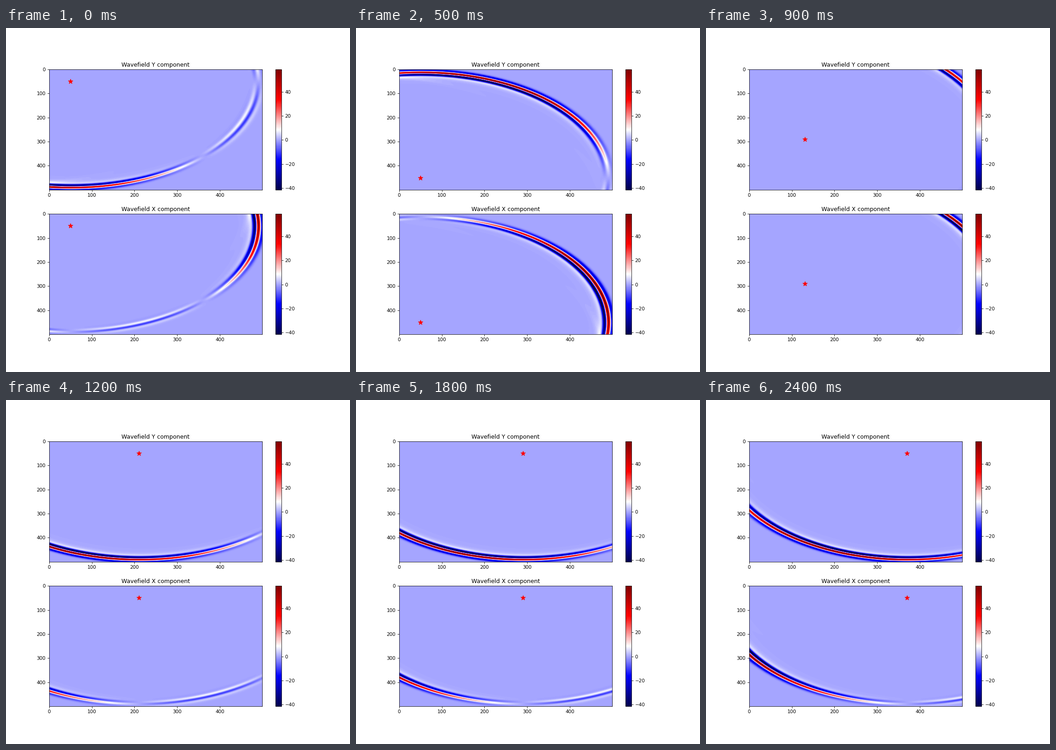
Recreate the animation shown at these times as a matplotlib script. Size 748 px wide and 748 px high, loop 2500 ms.

```python
import numpy as np
import matplotlib.pyplot as plt
from matplotlib.animation import FuncAnimation

N = 500             # grid points per side
RADIUS = 439        # distance travelled by the wavefront
WAVELENGTH = 25
PEAK = 53
SHIFT = 1           # the wave is centred one node past the marker
VMIN, VMAX = -41.3, 58.7
FRAMES = 25
DPI = 75

X, Y = np.meshgrid(np.arange(N, dtype=float), np.arange(N, dtype=float))


def make_pulse(n=8192, step=0.25):
    """Half-differentiated Ricker wavelet: shallow front, deep trailing lobe."""
    f = np.fft.rfftfreq(n, step)
    spectrum = f**2.5 * np.exp(-(f * WAVELENGTH)**2) * np.exp(0.25j * np.pi)
    pulse = np.fft.fftshift(np.fft.irfft(spectrum, n))
    lag = (np.arange(n) - pulse.argmax()) * step
    return lag, PEAK * pulse / pulse.max()


LAG, PULSE = make_pulse()


def ray(cx, cy):
    """Distance and P-wave polarisation for a diagonal force at (cx, cy)."""
    dx, dy = X - cx, Y - cy
    r = np.hypot(dx, dy) + 1e-9
    c, s = dx / r, dy / r
    return r, c * (c - s), s * (s - c)


def echo(cx, cy, depth):
    """Weak remainder of the wave sent back by an absorbing edge."""
    r, ux, uy = ray(cx, cy)
    amp = 4 * np.exp(-((r - RADIUS + 16) / 8)**2 - depth / 50)
    return amp * ux, amp * uy


def wavefield(sx, sy):
    r, ux, uy = ray(sx + SHIFT, sy + SHIFT)
    wave = np.interp(RADIUS - r, LAG, PULSE)
    fx, fy = wave * ux, wave * uy
    echoes = []
    if sx == 50:
        echoes.append(echo(-sx, sy, X))
    if sy == 50:
        echoes.append(echo(sx, -sy, Y))
    if sy == 450:
        echoes.append(echo(sx, 2 * N - sy, N - Y))
    for ex, ey in echoes:
        fx, fy = fx + ex, fy + ey
    return fx, fy


def source(i):
    col, row = divmod(i, 6)
    return 50 + 80 * col, 50 + 80 * row


fig, axes = plt.subplots(2, 1, figsize=(748 / DPI, 748 / DPI), dpi=DPI)
images, stars = [], []
for ax, name in zip(axes, "YX"):
    im = ax.imshow(np.zeros((N, N)), cmap="seismic", vmin=VMIN, vmax=VMAX,
                   aspect="auto")
    stars.append(ax.scatter([50], [50], s=100, c="red", marker="*"))
    ax.set_title(f"Wavefield {name} component")
    ax.set_xlim(-0.5, N - 0.5)
    ax.set_ylim(N - 0.5, -0.5)
    fig.colorbar(im, ax=ax)
    images.append(im)


def update(i):
    pos = source(i)
    fx, fy = wavefield(*pos)
    for im, star, field in zip(images, stars, (fy, fx)):
        im.set_data(field)
        star.set_offsets([pos])
    return images + stars


anim = FuncAnimation(fig, update, frames=FRAMES, interval=100, repeat=True,
                     repeat_delay=0, blit=False)
plt.show()
```
